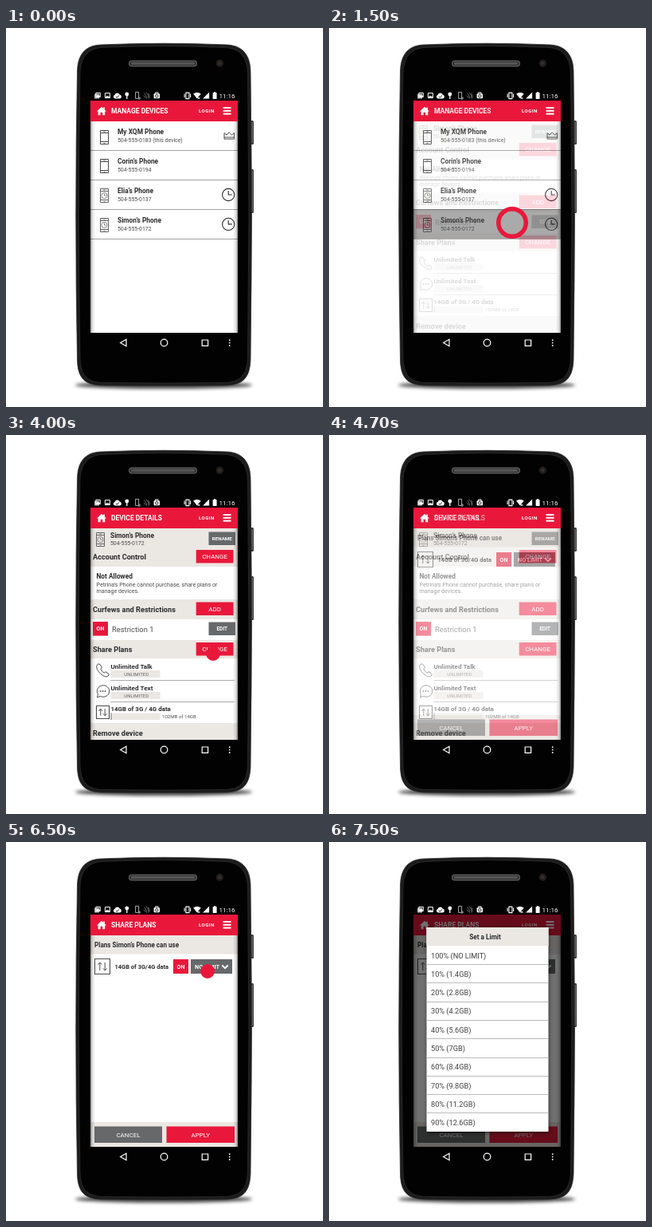
Animation, 398 px wide and 475 px high, one loop 8000 ms. Source, as an HTML page with a canvas:

```html
<!DOCTYPE html>
<html lang="en">
<head>
<meta charset="utf-8">
<title>Device manager demo</title>
<style>
html, body { margin: 0; width: 100%; height: 100%; overflow: hidden; background: #fff; }
canvas { display: block; width: 398px; height: 475px; }
</style>
</head>
<body>
<canvas id="stage"></canvas>
<script>
const W = 398, H = 475, LOOP = 8000, STEP = 100;
const RED = '#e9183b', BAND = '#ebe7e3', GREY = '#67686a', INK = '#2b2b2b', SOFT = '#4c4c4c';
const SCREEN = { x: 106, y: 91, w: 185, h: 291 };
const dpr = window.devicePixelRatio || 1;
let c;

function layer(draw, canvas = document.createElement('canvas')) {
  canvas.width = W * dpr;
  canvas.height = H * dpr;
  c = canvas.getContext('2d');
  c.scale(dpr, dpr);
  draw();
  return canvas;
}

function box(x, y, w, h, fill) {
  c.fillStyle = fill;
  c.fillRect(x, y, w, h);
}

function round(x, y, w, h, r, fill) {
  c.beginPath();
  c.roundRect(x, y, w, h, r);
  c.fillStyle = fill;
  c.fill();
}

function text(str, x, y, size, { weight = 400, color = INK, align = 'left' } = {}) {
  c.font = `${weight} ${size}px Roboto, sans-serif`;
  c.fillStyle = color;
  c.textAlign = align;
  c.fillText(str, x, y);
}

const bold = (str, x, y, size, color = INK) => text(str, x, y, size, { weight: 700, color });

function stroke(d, color = INK, width = 1) {
  c.strokeStyle = color;
  c.lineWidth = width;
  c.stroke(new Path2D(d));
}

function fill(d, color = '#fff') {
  c.fillStyle = color;
  c.fill(new Path2D(d));
}

function disc(x, y, r, color) {
  c.beginPath();
  c.arc(x, y, r, 0, 7);
  c.fillStyle = color;
  c.fill();
}

function ring(x, y, r, color = INK, width = 1) {
  c.beginPath();
  c.arc(x, y, r, 0, 7);
  c.strokeStyle = color;
  c.lineWidth = width;
  c.stroke();
}

function button(label, x, y, w, h, color, size, weight = 400) {
  box(x, y, w, h, color);
  text(label, x + w / 2, y + h / 2 + size * 0.36, size, { weight, color: '#fff', align: 'center' });
}

function clock(x, y, r, width = 1, color = INK) {
  ring(x, y, r, color, width);
  stroke(`M${x} ${y - r * 0.65}V${y}H${x + r * 0.6}`, color, width);
}

function handset(x, y, timed) {
  const color = timed ? '#666' : SOFT;
  stroke(`M${x + 0.5} ${y + 0.5}h10v17h-10zM${x} ${y + 3.5}h11M${x} ${y + 14.5}h11`, color);
  stroke(`M${x + 4} ${y + 2}h3M${x + 4.5} ${y + 16.3}h2`, color, 0.8);
  if (timed) clock(x + 5.5, y + 9, 3.6, 0.8, color);
}

function dataIcon(x, y, s) {
  stroke(`M${x + 0.5} ${y + 0.5}h${s - 1}v${s - 1}h${1 - s}z`, SOFT, 1.1);
  const a = x + s * 0.34, b = x + s * 0.66, top = y + s * 0.25, end = y + s * 0.75;
  stroke(`M${a} ${end}V${top}m-2.4 2.6l2.4 -2.6l2.4 2.6M${b} ${top}V${end}m-2.4 -2.6l2.4 2.6l2.4 -2.6`, SOFT);
}

function statusBar() {
  const dim = '#777';
  c.save();
  c.translate(-0.4, -0.4);
  round(111.5, 83, 6, 6, 0.5, '#bbb');
  stroke('M113.3 81.7h5.4v5.2h-5.4z', '#fff', 1);
  fill('M114 86.5l1.7-2.3 1.2 1.2.8-.8.8 1.9z');
  stroke('M124.8 82h6v6h-6z', '#fff', 1);
  fill('M125 88l2-3 1.4 1.5 1-1 1.3 2.5z');
  fill('M137.5 89a2.5 2.5 0 0 1 -.4 -4.9a3.2 3.2 0 0 1 6 -.2a2.6 2.6 0 0 1 .2 5.1z');
  stroke('M138.4 86.3l1.4 1.3 2.4-2.8', '#000', 0.9);
  disc(152.2, 83.4, 2.4, '#fff');
  stroke('M152.2 85v4.5', '#fff', 1.3);
  stroke('M163 80.8h4v8h-4zM166.5 87.5h2v2h-2', '#bbb', 0.9);
  stroke('M174 82q3 3 3 7M176 81q4 3 3.5 8M179 82q2 3 1.5 6M173.5 85l2 3', dim, 0.9);
  round(186, 82.7, 7.4, 6, 1, '#fff');
  stroke('M188 82.7v-1.4h3.4v1.4', '#fff', 1);
  ring(189.7, 85.7, 1.7, '#000', 0.9);
  stroke('M226.3 81.5h4v7.5h-4zM224.5 83v4.5M232 83v4.5', '#fff', 1.1);
  fill('M235.5 83q4.8-3.5 9.6 0l-4.8 6z');
  stroke('M241 87.3l3 2m0-2l-3 2', '#fff', 0.8);
  fill('M247.5 89l8-8v8z');
  round(260, 81.5, 5, 7.8, 0.6, '#fff');
  box(261.4, 80.6, 2.2, 1, '#fff');
  text('11:16', 267.8, 88, 8.1, { color: '#fff' });
  c.restore();
}

function groundShadow() {
  c.save();
  c.filter = `blur(${2 * dpr}px)`;
  c.beginPath();
  c.ellipse(198, 447.5, 111, 4.5, 0, 0, 7);
  c.fillStyle = 'rgba(0,0,0,.75)';
  c.fill();
  c.restore();
}

function phone() {
  box(0, 0, W, H, '#fff');
  groundShadow();
  for (const [y, h] of [[116, 30], [177, 55]]) {
    round(304, y, 7, h, 1.5, '#3c3c3c');
    box(308.8, y + 2, 1, h - 4, '#777');
  }
  const body = 'M119 21Q198 17.5 277 21C299 22 306.5 36 307 54Q310 235 307 416C306 438 298 447 277 448Q198 449 119 448C98 447 90 438 89.5 416Q86 235 89.5 54C90 36 97 22 119 21Z';
  fill(body, '#1b1b1b');
  stroke(body, '#343434', 0.8);
  c.save();
  c.translate(198.2, 234);
  c.scale(0.968, 0.984);
  c.translate(-198.2, -234);
  fill(body, '#020202');
  stroke(body, '#303030', 0.8);
  c.restore();

  round(154, 40.5, 86, 8, 4, '#606060');
  round(155.2, 41.7, 83.6, 5.6, 2.8, '#303030');
  round(157, 42.7, 80, 3.4, 1.7, '#555');
  disc(268.3, 44.3, 4.7, '#221d1d');
  disc(268.3, 44.3, 2.2, '#382c2e');
  statusBar();

  stroke('M151 390.3v8.4l-7.4-4.2z', '#fff', 1.2);
  ring(198.5, 394.5, 4.3, '#fff', 1.2);
  stroke('M246.2 391h7.4v7.4h-7.4z', '#fff', 1.2);
  for (const y of [391.2, 394.6, 398]) disc(280.7, y, 0.9, '#fff');
}

function page(title) {
  box(SCREEN.x, SCREEN.y, SCREEN.w, SCREEN.h, '#fff');
  box(106, 91, 185, 26, RED);
  fill('M114 104.6l6-5.8 2.3 2.2v-1.5h1.6v3l2.1 2.1h-1.8v4.6h-3v-3.4h-2.6v3.4h-3v-4.6z');
  bold(title, 132, 107.2, 8.5, '#fff');
  c.letterSpacing = '0.5px';
  bold('LOGIN', 242, 106, 6, '#fff');
  c.letterSpacing = '0px';
  for (const y of [99, 102.8, 106.6]) box(272.5, y, 10, 2, '#fff');
}

function edges() {
  for (const [from, to] of [[106, 112], [291, 285]]) {
    const shade = c.createLinearGradient(from, 0, to, 0);
    shade.addColorStop(0, 'rgba(0,0,0,.42)');
    shade.addColorStop(0.4, 'rgba(0,0,0,.12)');
    shade.addColorStop(1, 'rgba(0,0,0,0)');
    box(Math.min(from, to), 117, 6, 265, shade);
  }
}

function devicesPage() {
  page('MANAGE DEVICES');
  const devices = [
    ['My XQM Phone', '504-555-0183 (this device)'],
    ['Corin’s Phone', '504-555-0194'],
    ['Elia’s Phone', '504-555-0137'],
    ['Simon’s Phone', '504-555-0172']
  ];
  devices.forEach(([name, number], i) => {
    const y = 117 + i * 36.9, timed = i > 1;
    bold(name, 140, y + 16.3, 8.4);
    text(number, 140, y + 26.4, 6.9, { color: SOFT });
    handset(118, Math.round(y + 10.5), timed);
    if (timed) clock(279.2, y + 18.2, 7.6, 1.1);
    box(106, Math.round(y + 36.2), 185, 1, '#a3a3a3');
  });
  stroke('M274 131.5l3 2.6 3.2-3.4 3.2 3.4 3-2.6v7.6h-12.4zM274 137h12.4', SOFT);
  edges();
}

function detailsPage() {
  page('DEVICE DETAILS');
  for (const [y, h] of [[117, 48], [206, 25], [257, 23], [361, 21]]) box(106, y, 185, h, BAND);
  handset(113, 122, true);
  bold('Simon’s Phone', 131, 128.5, 8.4);
  text('504-555-0172', 131, 138.4, 6.9, { color: SOFT });
  button('RENAME', 254.5, 121.5, 33.5, 16.5, GREY, 6.2, 700);

  bold('Account Control', 109, 156.3, 9.2);
  bold('Curfews and Restrictions', 109, 221.5, 9.2);
  bold('Share Plans', 109, 271.8, 9.2);
  bold('Remove device', 109, 377.3, 9.2);
  [['CHANGE', 144], ['ADD', 209.5], ['CHANGE', 260]].forEach(([label, y]) =>
    button(label, 238.7, y, 46.8, 16.5, RED, 8));

  bold('Not Allowed', 113.5, 179.5, 8.3);
  text('Petrina’s Phone cannot purchase, share plans or', 113.5, 189.5, 7.15, { color: SOFT });
  text('manage devices.', 113.5, 198, 7.15, { color: SOFT });

  edges();
  button('ON', 109, 234, 19, 17.6, RED, 7, 700);
  text('Restriction 1', 133, 246.5, 9.4, { color: SOFT });
  button('EDIT', 254.5, 234.5, 33.5, 16.5, GREY, 6.4, 700);

  ['Talk', 'Text'].forEach((kind, i) => {
    const y = 280 + i * 27;
    bold('Unlimited ' + kind, 131.5, y + 12.8, 8.1);
    box(131.5, y + 15, 62, 9, BAND);
    text('UNLIMITED', 163.7, y + 21.7, 6, { color: '#666', align: 'center' });
    box(131, y + 27, 156, 1, '#aaa');
  });
  stroke('M114 288.5q2-3 4-1l2.2 3.4q.4 1.2-1.4 2.4q1.2 3 4.4 4.8q1.6-1.6 2.8-1l3 2.4q1 1.4-1.6 3q-3 1.6-8.6-3.2q-6.4-6-4.8-10.8z', SOFT);
  stroke('M114.5 328.8l1-4a7.7 7.2 0 1 1 3 2.6z', SOFT);
  for (const x of [118.6, 121.6, 124.6]) disc(x, 321, 0.9, SOFT);
  dataIcon(113, 339, 17);
  bold('14GB of 3G / 4G data', 131.5, 346, 7.95);
  box(131.5, 348.5, 62, 8.5, BAND);
  box(131.5, 348.5, 1, 8.5, '#777');
  text('102MB of 14GB', 196, 355, 6.1, { color: SOFT });
}

function sharePage() {
  page('SHARE PLANS');
  box(106, 117, 185, 23.5, BAND);
  bold('Plans Simon’s Phone can use', 111, 132, 8.15);
  dataIcon(111, 146, 20);
  bold('14GB of 3G/4G data', 136.5, 159, 7.5);
  button('ON', 210, 147, 19, 18, RED, 7, 700);
  box(232, 147, 52, 18, GREY);
  bold('NO LIMIT', 237, 158.8, 7.3, '#fff');
  stroke('M271.3 154.5l3.7 3.7 3.7-3.7', '#fff', 1.8);
  box(106, 351, 185, 31, BAND);
  button('CANCEL', 111, 356.5, 85, 20.5, GREY, 8);
  button('APPLY', 201.5, 356.5, 85.5, 20.5, RED, 8);
  edges();
}

function limitDialog() {
  sharePage();
  box(SCREEN.x, SCREEN.y, SCREEN.w, SCREEN.h, 'rgba(0,0,0,.56)');
  c.save();
  c.shadowColor = 'rgba(0,0,0,.7)';
  c.shadowBlur = 5 * dpr;
  c.shadowOffsetY = dpr;
  box(122.5, 107, 153, 256, '#fff');
  c.restore();
  box(122.5, 107, 153, 23, BAND);
  text('Set a Limit', 196, 121.7, 8.2, { weight: 700, align: 'center' });
  for (let i = 0; i < 10; i++) {
    const y = 130 + i * 23.3;
    const share = i ? `${i * 10}% (${+(i * 1.4).toFixed(1)}GB)` : '100% (NO LIMIT)';
    text(share, 128, y + 15.5, 9.2, { color: '#404040' });
    if (i < 9) box(122.5, Math.round(y + 23), 153, 1, '#bbb');
  }
}

const backdrop = layer(phone);
const pages = [devicesPage, detailsPage, sharePage, limitDialog].map(draw => layer(draw));
const taps = [
  { at: 1000, x: 230, y: 244, row: [227, 37] },
  { at: 4000, x: 260, y: 274 },
  { at: 6500, x: 253, y: 162 }
];
const stage = document.getElementById('stage');
layer(() => {}, stage);

function show(image, alpha = 1) {
  c.globalAlpha = alpha;
  c.drawImage(image, 0, 0, W, H);
  c.globalAlpha = 1;
}

// A dot opens into a ring over five steps, then the next page fades in.
function tapMark({ x, y }, step) {
  const grow = Math.min(step / 5, 1);
  const outer = 9 + 11 * grow, inner = 14.5 * grow;
  c.globalAlpha = step > 5 ? 0.5 : 1;
  ring(x, y, (outer + inner) / 2, RED, outer - inner);
  c.globalAlpha = 1;
}

function render(now) {
  const t = now % LOOP;
  const index = taps.findLastIndex(tap => t >= tap.at);
  show(backdrop);
  if (index < 0) {
    show(pages[0]);
  } else {
    const tap = taps[index];
    const step = Math.floor((t - tap.at) / STEP);
    const fade = Math.min(Math.max((step - 4) / 6, 0), 1);
    show(pages[index]);
    if (tap.row) box(106, tap.row[0], 185, tap.row[1], `rgba(0,0,0,${0.4 * Math.min(step / 3, 1)})`);
    if (fade) show(pages[index + 1], fade);
    if (step <= 6) tapMark(tap, step);
  }
}

const start = performance.now();
function tick() {
  render(performance.now() - start);
  requestAnimationFrame(tick);
}
tick();
</script>
</body>
</html>
```
